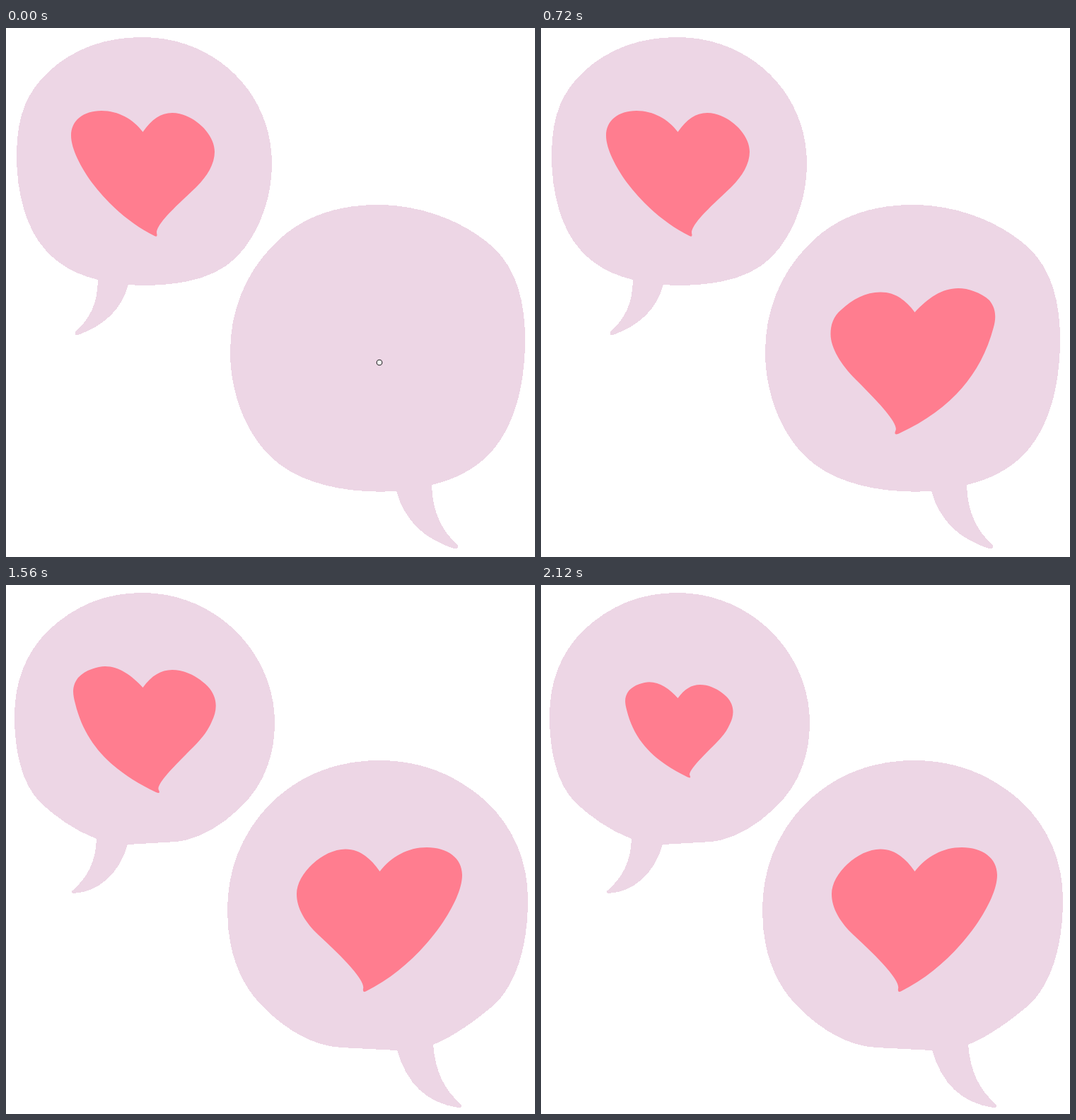
An HTML page for the animation above (2160 ms loop, 748x748 px).

```html
<!DOCTYPE html>
<html lang="en">
<head>
<meta charset="utf-8">
<title>Heart chat</title>
<style>
  html, body { margin: 0; width: 100%; height: 100%; overflow: hidden; background: #fff; }
  svg { display: block; width: 100vw; height: 100vh; }
  .bubble { fill: #edd6e5; shape-rendering: crispEdges; }
  .heart { fill: #ff7d8f; }
  .dot { fill: #fff; stroke: #222; stroke-width: 1.1; }
</style>
</head>
<body>
<svg viewBox="0 0 748 748">
  <path class="bubble"/>
  <path class="bubble"/>
  <path class="heart"/>
  <path class="heart"/>
  <circle class="dot" cx="193.5" cy="206" r="3.8"/>
  <circle class="dot" cx="528" cy="473" r="3.8"/>
</svg>
<script>
const LOOP = 2160, TICK = 40, HOLD = 120;

// Scale of a heart on each tick after it pops in.
const POP = [0, .03, .03, .2, .45, .756, 1.073, 1.035, 1];

// Every shape has two drawings that alternate.
const chats = [
  {
    x: 193.5, y: 206, start: 1920,
    bubble: [
      `M193 13C294 13 376 90 376 192C376 245 355 295 325 325C297 352 255 364 190 364L173 363
       C163 400 137 421 102 434Q96 435 98 430C120 409 129 390 130 356
       C88 346 57 324 38 288C22 257 15 220 15 180C15 120 32 88 62 60C97 29 140 13 193 13Z`,
      `M193 11C296 11 380 95 380 195C380 245 362 287 329 317C302 342 272 360 240 363L172 367
       C160 409 130 434 96 436Q90 435 94 432C116 413 127 390 128 359
       C95 346 71 328 50 309C22 282 12 235 12 185C12 139 27 97 59 65C98 28 142 11 193 11Z`
    ],
    heart: [
      `M193.5 147C206 129 219 120 235 120C263 120 295 148 295 175C295 192 285 209 269 225
       C243 250 209 279 213.5 292Q214 296 210 294C176 277 146 251 121 218
       C106 197 92 171 92 152C92 131 109 117 135 117C159 117 180 129 193.5 147Z`,
      `M193.5 145C206 128 219 120 235 120C254 120 272 130 285 143C300 159 299 177 291 193
       C286 205 278 216 265 229C243 251 211 282 216 290Q219 296 212 293
       C154 265 113 229 98 168C94 153 93 143 102 131C112 120 130 115 140 115C160 115 178 128 193.5 145Z`
    ]
  },
  {
    x: 528, y: 473, start: 0,
    bubble: [
      `M525 250C592 250 652 276 691 312C723 343 734 390 734 440C734 510 717 566 684 602
       C662 624 636 638 602 646C603 685 616 710 639 732Q641 737 633 736C591 722 564 697 552 655
       C477 659 414 643 376 608C338 572 317 515 317 458C317 402 337 349 377 308C414 269 464 250 525 250Z`,
      `M527 248C590 248 638 270 679 306C718 343 738 391 738 445C738 505 724 560 692 592
       C668 613 634 638 604 650C607 687 619 713 643 734Q647 739 639 739C595 732 567 706 553 658
       L474 654C436 652 399 631 367 600C332 567 313 520 313 460C313 404 332 353 372 311C414 269 467 248 527 248Z`
    ],
    heart: [
      `M528.5 402C515 383 499 373.5 480 373.5C459 373.5 440 384 425 398C413 408 409.5 420 409.5 433
       C409.5 452 424 476 445 497C470 522 506 558 501.5 569Q498 577 506 573.5
       C574 542 621 495 640 423C644 409 643 396 634 385C622 374 604 368 590 368C567 368 547 382 528.5 402Z`,
      `M528.5 405C515 385 499 373.5 480 373.5C448 373.5 411 408 411 437C411 457 423 477 442 495
       C468 519 509 558 505 571Q504 577 509 574.5C552 553 588 519 615 481
       C633 455 645 429 645 410C645 386 624 371 595 371C568 371 545 384 528.5 405Z`
    ]
  }
];

const all = name => document.querySelectorAll(name);
const bubbles = all('.bubble'), hearts = all('.heart'), dots = all('.dot');

function draw(time) {
  const pose = Math.floor(time / HOLD) % 2;
  chats.forEach((chat, i) => {
    const age = Math.floor((time - chat.start) / TICK);
    const popping = age >= 0 && age < POP.length;
    const scale = popping ? POP[age] : 1;
    bubbles[i].setAttribute('d', chat.bubble[pose]);
    hearts[i].setAttribute('d', chat.heart[popping ? 1 : pose]);
    hearts[i].setAttribute('transform',
      `translate(${chat.x} ${chat.y}) scale(${scale}) translate(${-chat.x} ${-chat.y})`);
    dots[i].style.display = scale ? 'none' : '';
  });
}

const begin = performance.now();
function frame() {
  draw((performance.now() - begin) % LOOP);
  requestAnimationFrame(frame);
}
frame();
</script>
</body>
</html>
```
